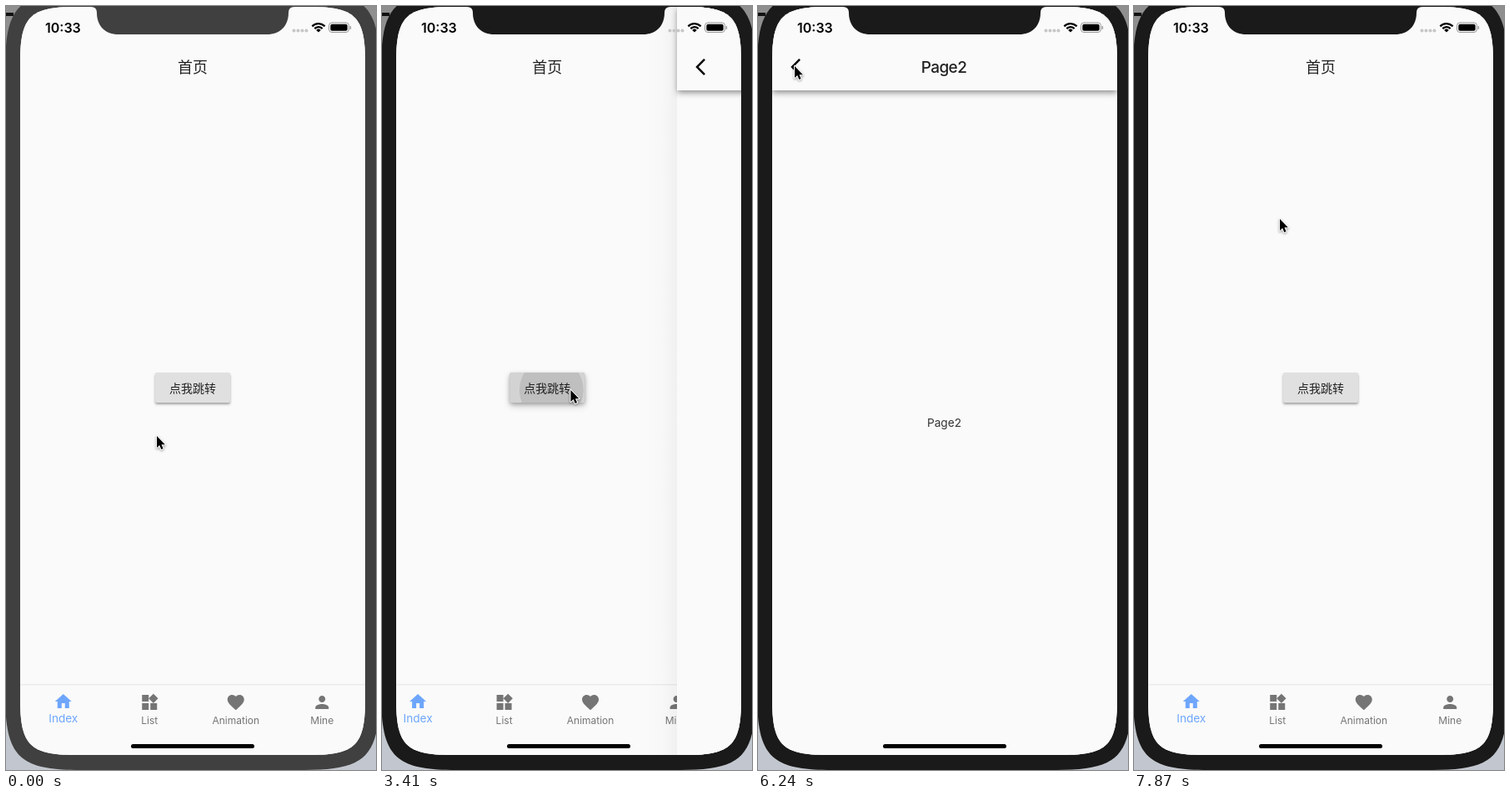
Recreate the animation shown at these times as an HTML page with a canvas. Size 444 by 915 pixels, loop 8000 ms.

```html
<!DOCTYPE html>
<html lang="zh">
<head>
<meta charset="utf-8">
<title>Page transition</title>
<style>
  html, body { margin: 0; width: 100%; height: 100%; overflow: hidden; }
  canvas { display: block; width: 444px; height: 915px; }
</style>
</head>
<body>
<canvas id="stage"></canvas>
<script>
const W = 444, H = 915, LOOP = 8000;
const SCREEN = { x: 17, y: 1, w: 414, h: 896 };
const PAPER = '#fafafa', INK = '#212121', GREY = '#757575', BLUE = '#6ea6fc';
const LATIN = 'Inter, sans-serif';
const HAN = '"Noto Sans CJK SC", "Noto Sans CJK", sans-serif';

const canvas = document.getElementById('stage');
const ctx = canvas.getContext('2d');
const dpr = window.devicePixelRatio || 1;
canvas.width = W * dpr;
canvas.height = H * dpr;

const ICONS = {
  home: new Path2D('M10 20v-6h4v6h5v-8h3L12 3 2 12h3v8z'),
  widgets: new Path2D('M13 13v8h8v-8zM3 21h8v-8H3zM3 3v8h8V3zM16.66 1.69L11 7.34 16.66 13l5.66-5.66z'),
  heart: new Path2D('M12 21.35l-1.45-1.32C5.4 15.36 2 12.28 2 8.5 2 5.42 4.42 3 7.5 3c1.74 0 3.41.81 4.5 2.09C13.09 3.81 14.76 3 16.5 3 19.58 3 22 5.42 22 8.5c0 3.78-3.4 6.86-8.55 11.54z'),
  person: new Path2D('M12 12c2.21 0 4-1.79 4-4s-1.79-4-4-4-4 1.79-4 4 1.79 4 4 4zm0 2c-2.67 0-8 1.34-8 4v2h16v-2c0-2.66-5.33-4-8-4z'),
  back: new Path2D('M11.67 3.87L9.9 2.1 0 12l9.9 9.9 1.77-1.77L3.54 12z'),
  cursor: new Path2D('M0 0V14L3.2 11 5.3 16 7.6 15 5.5 10.2H9.9Z')
};

const TABS = [
  { label: 'Index', icon: 'home', active: true },
  { label: 'List', icon: 'widgets' },
  { label: 'Animation', icon: 'heart' },
  { label: 'Mine', icon: 'person' }
];

// Each move is sampled in discrete steps, the first landing at `start`.
const MOVES = [
  { start: 750, end: 1770, steps: 8, from: [181, 515], to: [220.5, 459] },
  { start: 1920, end: 2070, steps: 2, from: [220.5, 459], to: [226.5, 460] },
  { start: 4610, end: 4610, steps: 1, from: [226.5, 460], to: [225, 449] },
  { start: 4750, end: 4900, steps: 2, from: [225, 449], to: [120, 188] },
  { start: 5350, end: 6240, steps: 7, from: [120, 188], to: [44, 72] },
  { start: 7730, end: 7870, steps: 2, from: [44, 72], to: [175, 255] }
];

// [time, share of the second page that has slid in]
const SLIDE = [[0, 0], [3410, 0.186], [3560, 0.93], [3710, 1], [7140, 0.65], [7290, 0.06], [7430, 0]];

function cursorAt(t) {
  let pos = MOVES[0].from;
  for (const m of MOVES) {
    if (t < m.start) break;
    const gap = (m.end - m.start) / (m.steps - 1) || 1;
    const step = Math.min(m.steps, 1 + Math.floor((t - m.start) / gap + 0.02));
    const k = step / m.steps;
    const e = m.steps > 2 ? k * k * (3 - 2 * k) : k;
    pos = m.from.map((a, i) => a + (m.to[i] - a) * e);
  }
  return pos;
}

function slideAt(t) {
  return SLIDE.filter(([at]) => at <= t).pop()[1];
}

function text(str, x, y, font, color, align = 'center', spacing = 0) {
  ctx.font = font;
  ctx.fillStyle = color;
  ctx.textAlign = align;
  ctx.letterSpacing = spacing + 'px';
  ctx.fillText(str, x, y);
  ctx.letterSpacing = '0px';
}

function icon(name, x, y, color) {
  ctx.save();
  ctx.translate(x, y);
  ctx.fillStyle = color;
  ctx.fill(ICONS[name]);
  ctx.restore();
}

function circle(x, y, r, color) {
  ctx.fillStyle = color;
  ctx.beginPath();
  ctx.arc(x, y, r, 0, Math.PI * 2);
  ctx.fill();
}

function roundRect(x, y, w, h, r, color) {
  ctx.fillStyle = color;
  ctx.beginPath();
  ctx.roundRect(x, y, w, h, r);
  ctx.fill();
}

function withShadow(alpha, blur, dy, draw) {
  ctx.save();
  ctx.shadowColor = `rgba(0,0,0,${alpha})`;
  ctx.shadowBlur = blur * dpr;
  ctx.shadowOffsetY = dy * dpr;
  draw();
  ctx.restore();
}

// Rectangle with continuous-curvature corners.
function squircle(x, y, w, h, e) {
  const k = e * 0.18, r = x + w, b = y + h;
  ctx.beginPath();
  ctx.moveTo(x + e, y);
  ctx.lineTo(r - e, y);
  ctx.bezierCurveTo(r - k, y, r, y + k, r, y + e);
  ctx.lineTo(r, b - e);
  ctx.bezierCurveTo(r, b - k, r - k, b, r - e, b);
  ctx.lineTo(x + e, b);
  ctx.bezierCurveTo(x + k, b, x, b - k, x, b - e);
  ctx.lineTo(x, y + e);
  ctx.bezierCurveTo(x, y + k, x + k, y, x + e, y);
  ctx.closePath();
}

function drawBackdrop() {
  ctx.fillStyle = '#8f8f8f';
  ctx.fillRect(0, 0, W, 60);
  ctx.fillStyle = '#111';
  ctx.fillRect(0, 8, 9, 4);
  ctx.fillStyle = '#c2c7cf';
  ctx.fillRect(0, 60, W, H - 60);
}

function drawButton(pressed) {
  const fill = pressed ? '#d3d3d3' : '#e0e0e0';
  const box = () => roundRect(179, 439, 90, 36, 2, fill);
  if (pressed) {
    withShadow(0.2, 9, 4, box);
    withShadow(0.22, 4, 2, box);
    ctx.save();
    ctx.beginPath();
    ctx.roundRect(179, 439, 90, 36, 2);
    ctx.clip();
    circle(229, 460, 38.5, '#bfbfbf');
    ctx.restore();
  } else {
    withShadow(0.36, 3, 2, box);
  }
  text('点我跳转', 224, 462.5, '500 14px ' + HAN, INK);
}

function drawHome(pressed) {
  ctx.fillStyle = PAPER;
  ctx.fillRect(17, 1, 414, 896);
  text('首页', 224, 79.5, '400 18px ' + HAN, INK);
  drawButton(pressed);
  ctx.fillStyle = '#ebebeb';
  ctx.fillRect(17, 812, 414, 1.5);
  TABS.forEach(({ label, icon: name, active }, i) => {
    const x = 17 + 414 * (i + 0.5) / 4;
    const color = active ? BLUE : GREY;
    icon(name, x - 12, active ? 821 : 822, color);
    text(label, x, active ? 858 : 860, `400 ${active ? 13.6 : 12}px ${LATIN}`, color);
  });
}

function drawEdgeShadow(amount) {
  const g = ctx.createLinearGradient(-24.4, 0, 17, 0);
  [[0, 0], [0.3, 0.016], [0.6, 0.07], [1, 0.22]].forEach(([stop, a]) =>
    g.addColorStop(stop, `rgba(0,0,0,${a * amount})`));
  ctx.fillStyle = g;
  ctx.fillRect(-24.4, 1, 41.4, 896);
}

function drawDetail(amount, rippling) {
  drawEdgeShadow(amount);
  ctx.fillStyle = PAPER;
  ctx.fillRect(17, 1, 414, 896);
  text('Page2', 223.5, 503.5, '400 13.7px ' + LATIN, '#333');
  withShadow(0.42, 7, 3, () => {
    ctx.fillStyle = PAPER;
    ctx.fillRect(17, 1, 414, 100);
  });
  if (rippling) {
    ctx.save();
    ctx.beginPath();
    ctx.rect(17, 1, 414, 100);
    ctx.clip();
    circle(45, 73, 35, '#f1f1f1');
    ctx.restore();
  }
  icon('back', 39.3, 61, '#000');
  text('Page2', 223, 79.5, '500 19px ' + LATIN, INK, 'center', -0.6);
}

function drawNotch(color) {
  ctx.fillStyle = color;
  ctx.beginPath();
  ctx.moveTo(102, 0);
  ctx.lineTo(102, 1);
  ctx.quadraticCurveTo(109, 1, 109, 8);
  ctx.bezierCurveTo(109, 24, 119, 34, 135, 34);
  ctx.lineTo(313, 34);
  ctx.bezierCurveTo(329, 34, 339, 24, 339, 8);
  ctx.quadraticCurveTo(339, 1, 346, 1);
  ctx.lineTo(346, 0);
  ctx.fill();
}

function drawStatus() {
  text('10:33', 47, 31.5, '600 16px ' + LATIN, '#000', 'left');
  for (let i = 0; i < 4; i++) circle(345.5 + i * 5, 29.5, 2, '#c6c6c6');

  const fan = r => ctx.arc(375, 31.5, r, -Math.PI * 0.76, -Math.PI * 0.24);
  ctx.fillStyle = ctx.strokeStyle = '#000';
  ctx.lineWidth = 2.3;
  for (const r of [6.4, 10.4]) {
    ctx.beginPath();
    fan(r);
    ctx.stroke();
  }
  ctx.beginPath();
  ctx.moveTo(375, 31.5);
  fan(3.8);
  ctx.fill();

  ctx.strokeStyle = '#999';
  ctx.lineWidth = 1;
  ctx.beginPath();
  ctx.roundRect(387.5, 20, 24, 11.5, 3.5);
  ctx.stroke();
  roundRect(389.3, 21.8, 20.4, 7.9, 2, '#000');
  roundRect(412.7, 24, 1.4, 4, 0.7, '#999');
}

function drawCursor([x, y]) {
  ctx.save();
  ctx.translate(x, y);
  ctx.lineJoin = 'round';
  ctx.lineWidth = 2;
  ctx.strokeStyle = '#fff';
  withShadow(0.4, 3, 1.2, () => ctx.stroke(ICONS.cursor));
  ctx.fillStyle = '#000';
  ctx.fill(ICONS.cursor);
  ctx.restore();
}

function draw(t) {
  const slide = slideAt(t);
  const bezel = t < 3410 ? '#404040' : '#1a1a1a';
  ctx.setTransform(dpr, 0, 0, dpr, 0, 0);
  drawBackdrop();
  squircle(-1, -16, 449, 931, 90);
  ctx.fillStyle = bezel;
  ctx.fill();

  ctx.save();
  squircle(SCREEN.x, SCREEN.y, SCREEN.w, SCREEN.h, 66);
  ctx.fillStyle = PAPER;
  ctx.fill();
  ctx.clip();
  if (slide < 1) {
    ctx.save();
    ctx.translate(-slide * SCREEN.w / 3, 0);
    drawHome(t >= 3410 && t < 3710);
    ctx.restore();
  }
  if (slide > 0) {
    ctx.save();
    ctx.translate((1 - slide) * SCREEN.w, 0);
    drawDetail(slide, t >= 7140);
    ctx.restore();
  }
  ctx.restore();

  drawNotch(bezel);
  drawStatus();
  roundRect(150, 884, 148, 5, 2.5, '#000');
  drawCursor(cursorAt(t));
}

function frame() {
  draw(performance.now() % LOOP);
  requestAnimationFrame(frame);
}
frame();
</script>
</body>
</html>
```
